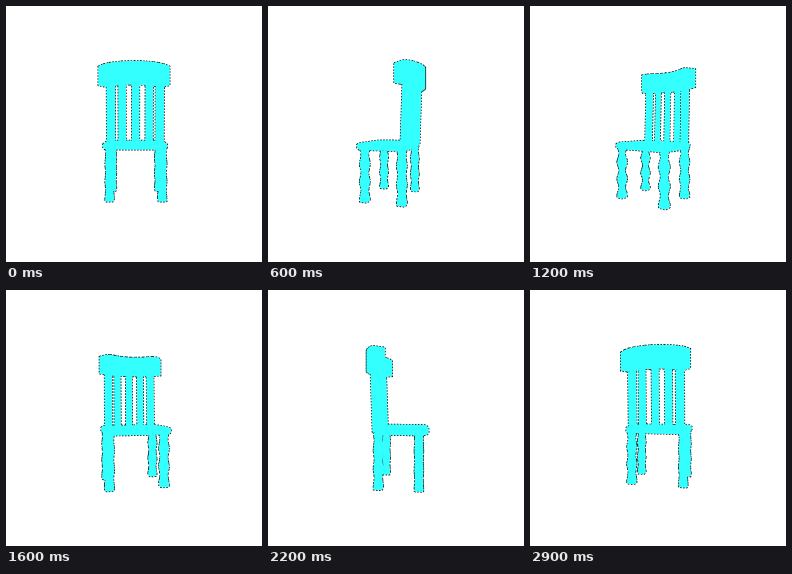
Recreate the animation shown at these times as an HTML page with a canvas. Size 256 by 256 pixels, loop 3000 ms.

```html
<!DOCTYPE html>
<html lang="en">
<head>
<meta charset="utf-8">
<title>Turning chair</title>
<style>
  html, body { margin: 0; width: 100%; height: 100%; overflow: hidden; background: #fff; }
  canvas { display: block; width: 256px; height: 256px; }
</style>
</head>
<body>
<canvas id="stage" width="256" height="256"></canvas>
<script>
const ctx = document.getElementById('stage').getContext('2d');
const LOOP = 3000, STEPS = 30;
const EYE = 233, PITCH = 0.075, CX = 128, HORIZON = 138;

let path, cos, sin;

// a: sideways, b: towards the backrest, y: up
function project([a, b, y]) {
  const x = a * cos + b * sin;
  const z = b * cos - a * sin;
  const s = 1 / (1 - z / EYE);
  return [CX + x * s, HORIZON - (y - PITCH * z) * s];
}

function hull(points) {
  const pts = points.map(project).sort((p, q) => p[0] - q[0] || p[1] - q[1]);
  const half = list => {
    const out = [];
    for (const p of list) {
      while (out.length > 1) {
        const [u, v] = out.slice(-2);
        if ((v[0] - u[0]) * (p[1] - u[1]) - (v[1] - u[1]) * (p[0] - u[0]) > 0) break;
        out.pop();
      }
      out.push(p);
    }
    return out.slice(0, -1);
  };
  const ring = half(pts).concat(half(pts.reverse()));
  ring.forEach((p, i) => i ? path.lineTo(...p) : path.moveTo(...p));
  path.closePath();
}

// Upright oval bar whose top leans back
function bar(a, b, ra, rb, lean) {
  const pts = [];
  for (let i = 0; i < 12; i++) {
    const t = i / 6 * Math.PI;
    const x = a + ra * Math.cos(t), z = b + rb * Math.sin(t);
    pts.push([x, z, -2], [x, z + lean, 58]);
  }
  hull(pts);
}

// Square leg with its corners cut away in waves
function leg(a, b) {
  const top = -2.5, bottom = -52.3, n = 20;
  const ring = i => {
    const t = i / n, y = top + (bottom - top) * t;
    const wave = 0.5 - 0.5 * Math.cos(t * Math.PI * 6 + 0.6);
    const r = 3.9 - 0.4 * wave, inner = r * (0.8 - 0.65 * wave);
    const pts = [];
    for (const u of [-1, 1]) for (const v of [-1, 1])
      pts.push([a + u * r, b + v * inner, y], [a + u * inner, b + v * r, y]);
    return pts;
  };
  for (let i = 0; i < n; i++) hull(ring(i).concat(ring(i + 1)));
}

function seat() {
  const pts = [];
  const bend = v => Math.sign(v) * Math.abs(v) ** 0.33;
  for (let i = 0; i < 48; i++) {
    const t = i / 48 * Math.PI * 2;
    const a = 1 + 31.3 * bend(Math.cos(t)), b = -7 + 25 * bend(Math.sin(t));
    pts.push([a, b, 0.5], [a, b, -2.5], [a * 0.96, b * 0.96, 1.7], [a * 0.96, b * 0.96, -4]);
  }
  hull(pts);
}

// Curved top rail, wider on its outer face
function rail() {
  const n = 12, low = 55.7, high = 75;
  const edge = i => {
    const u = i / n * 2 - 1, arc = 1 - u * u, drop = 1.5 * u ** 8;
    return [[27 * u, 7 + 13 * arc], [33.3 * u, 16 + 13 * arc]]
      .flatMap(([a, b]) => [[a, b, low], [a, b, high - drop]]);
  };
  for (let i = 0; i < n; i++) hull(edge(i).concat(edge(i + 1)));
}

function draw(step) {
  const angle = step / STEPS * Math.PI * 2;
  cos = Math.cos(angle);
  sin = Math.sin(angle);
  path = new Path2D();
  for (const side of [-1, 1]) {
    leg(1.8 + side * 25.2, -23);
    leg(1.8 + side * 24.8, 13);
    bar(1.2 + side * 22.7, 15, 4, 4, 2);
  }
  for (const side of [-1, 0, 1]) bar(1.5 + side * 12.4, 18, 3.5, 1.5, 2);
  rail();
  seat();

  ctx.fillStyle = '#fff';
  ctx.fillRect(0, 0, 256, 256);
  ctx.strokeStyle = '#000';
  ctx.lineWidth = 1.4;
  ctx.setLineDash([1.6, 1.4]);
  ctx.stroke(path);
  ctx.fillStyle = '#3ff';
  ctx.fill(path);
}

let shown = -1;
function tick() {
  const step = Math.floor(performance.now() % LOOP / LOOP * STEPS);
  if (step !== shown) draw(shown = step);
  requestAnimationFrame(tick);
}
tick();
</script>
</body>
</html>
```
